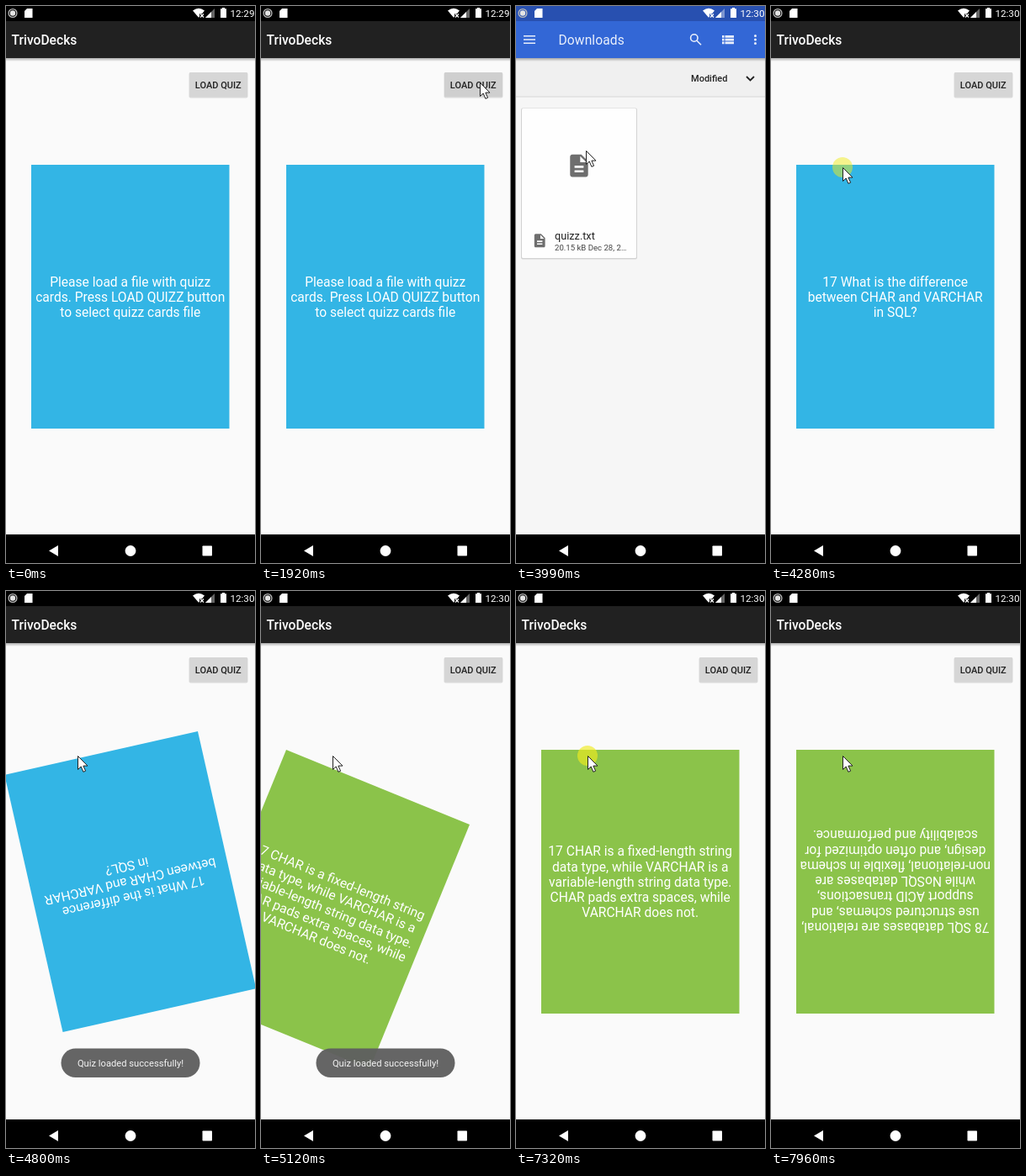
Write an HTML page that moves like this. It is 296 by 663 pixels and loops after 8 s.

```html
<!DOCTYPE html>
<html lang="en">
<head>
<meta charset="utf-8">
<title>Quiz cards</title>
<style>
  html, body { margin: 0; width: 100%; height: 100%; overflow: hidden; background: #fafafa; }
  svg { display: block; width: 296px; height: 663px; font-family: Roboto, sans-serif; }
  .mid { text-anchor: middle; }
  .med { font-weight: 500; }
</style>
</head>
<body>
<svg viewBox="0 0 296 663">
  <defs>
    <linearGradient id="shade" x2="0" y2="1">
      <stop stop-color="#000" stop-opacity=".3"/>
      <stop offset="1" stop-color="#000" stop-opacity="0"/>
    </linearGradient>
    <path id="doc" d="M14 2H6C4.9 2 4 2.9 4 4v16c0 1.1.9 2 2 2h12c1.1 0 2-.9 2-2V8zM16 18H8v-2h8zM16 14H8v-2h8zM13 9V3.5L18.500 9z"/>
  </defs>

  <rect width="296" height="663" fill="#fafafa"/>
  <rect x="217.500" y="79" width="70" height="30.500" rx="2" fill="#000" opacity=".13"/>
  <rect id="button" x="218" y="79" width="69" height="29" rx="1.500"/>
  <text class="mid med" x="252.300" y="97.500" font-size="11" fill="#1f1f1f">LOAD QUIZ</text>

  <g id="card">
    <rect id="face" x="30" y="189" width="235.500" height="314"/>
    <g id="words" class="mid" font-size="15.600" fill="#fff"></g>
  </g>

  <rect y="62" width="296" height="4" fill="url(#shade)"/>
  <rect y="18" width="296" height="44" fill="#212121"/>
  <text class="med" x="6.500" y="46" font-size="15.600" fill="#fff">TrivoDecks</text>
  <rect width="296" height="18" fill="#000"/>

  <g id="toast">
    <rect x="65.500" y="544.500" width="165" height="34.500" rx="17.200" fill="#5f5f5f" fill-opacity=".96"/>
    <text class="mid" x="148" y="566" font-size="11.200" fill="#f4f4f4">Quiz loaded successfully!</text>
  </g>

  <g id="files">
    <rect width="296" height="663" fill="#f6f6f6"/>
    <rect y="62" width="296" height="46" fill="#f0f0f0"/>
    <rect y="107.500" width="296" height="1" fill="#d8d8d8"/>
    <rect y="62" width="296" height="4" fill="url(#shade)"/>
    <rect y="18" width="296" height="44" fill="#3367d6"/>
    <rect width="296" height="18" fill="#2850b0"/>
    <g fill="#e9effb">
      <path d="M9 35h14v1.500H9zM9 39.300h14v1.500H9zM9 43.600h14v1.500H9z"/>
      <text x="50.500" y="46" font-size="15.600" letter-spacing=".1">Downloads</text>
      <path d="M245 35h2.500v2.800H245zM248.500 35h10.500v2.800H248.500zM245 38.700h2.500v2.800H245zM248.500 38.700h10.500v2.800H248.500zM245 42.400h2.500v2.800H245zM248.500 42.400h10.500v2.800H248.500z"/>
      <circle cx="284.500" cy="35.500" r="1.500"/><circle cx="284.500" cy="40" r="1.500"/><circle cx="284.500" cy="44.500" r="1.500"/>
    </g>
    <g fill="none" stroke="#e9effb" stroke-width="1.600">
      <circle cx="211.800" cy="38" r="4.200"/><path d="M215 41.200l5 5"/>
    </g>
    <text class="med" x="208" y="90" font-size="11" fill="#222">Modified</text>
    <path d="M274 84l4.500 4.500 4.500-4.500" fill="none" stroke="#222" stroke-width="1.800"/>
    <rect x="6" y="121.500" width="138" height="180" rx="2" fill="#000" opacity=".14"/>
    <rect x="7" y="122" width="136" height="178" rx="1.500" fill="#fefefe"/>
    <g fill="#6e6e6e" fill-rule="evenodd">
      <use href="#doc" transform="translate(58.900 174) scale(1.340)"/>
      <use href="#doc" transform="translate(18.600 269.700) scale(.8)"/>
    </g>
    <text x="46" y="278" font-size="12.700" fill="#222">quizz.txt</text>
    <text x="46" y="291" font-size="9.600" fill="#444">20.15 kB Dec 28, 2…</text>
  </g>

  <g fill="#fff">
    <circle cx="8" cy="8.500" r="4.900" fill="none" stroke="#bbb" stroke-width="1.300"/>
    <circle cx="8" cy="8.500" r="3.200" fill="#e4e4e4"/>
    <path d="M25 3h6.500v11H22V6z"/>
    <path d="M222 5.500q7-5.500 14 0l-3 3.800h-3v3.500l-1 1z"/>
    <path d="M231 9.500l4 4m0-4l-4 4" stroke="#fff" stroke-width="1.200"/>
    <path d="M248 3v11h-11z" opacity=".4"/><path d="M244 7v7h-7z"/>
    <path d="M257 2h3v1.300h2V14h-7V3.300h2z"/>
    <text id="clock" x="295.500" y="13" font-size="11.700" text-anchor="end"></text>
  </g>

  <rect y="629" width="296" height="34" fill="#000"/>
  <g fill="#fff">
    <path d="M51 648.500l11-6.500v13z"/>
    <circle cx="148" cy="648.500" r="6.400"/>
    <rect x="233.500" y="642.500" width="11.500" height="12" rx=".8"/>
  </g>

  <g id="mouse">
    <circle id="click" r="12" fill="#f0eb1e"/>
    <path d="M.5.500V16.500L4.200 13 6.900 19.300 9.600 18.200 6.900 12.100H12z" fill="#fff" stroke="#222" stroke-width="1"/>
  </g>
</svg>

<script>
const LOOP = 8000, HALF = 350;
const $ = id => document.getElementById(id);
const set = (id, name, value) => $(id).setAttribute(name, value);

const BLUE = '#33b5e5', GREEN = '#8bc34a';
const faces = {
  intro: [BLUE, 'Please load a file with quizz|cards. Press LOAD QUIZZ button|to select quizz cards file'],
  ask: [BLUE, '17 What is the difference|between CHAR and VARCHAR|in SQL?'],
  answer: [GREEN, '17 CHAR is a fixed-length string|data type, while VARCHAR is a|variable-length string data type.|CHAR pads extra spaces, while|VARCHAR does not.'],
  next: [GREEN, '78 SQL databases are relational,|use structured schemas, and|support ACID transactions,|while NoSQL databases are|non-relational, flexible in schema|design, and often optimized for|scalability and performance.']
};
const flips = [
  { start: 4500, anchor: 5120, step: 66, from: 'ask', to: 'answer' },
  { start: 7610, anchor: 7960, step: 64, from: 'answer', to: 'next' }
];
const path = [
  [500, 297, 97], [1150, 260, 91], [3430, 260, 91],
  [3680, 83, 172], [4110, 83, 172], [4280, 85, 192], [4360, 85, 192], [4430, 85, 196]
];
// start, end, strength
const clicks = [[1600, 1660, .6], [4230, 4360, .5], [7320, 7440, .65]];

const clamp = x => Math.max(0, Math.min(1, x));
const ease = x => (1 - Math.cos(Math.PI * clamp(x))) / 2;
const ramp = (t, a, b) => clamp((t - a) / (b - a));

let shown = '';
function showFace(name) {
  if (name === shown) return;
  shown = name;
  const [color, text] = faces[name], lines = text.split('|');
  set('face', 'fill', color);
  $('words').innerHTML = lines.map((line, i) =>
    `<text x="147.700" y="${351.8 + (i - (lines.length - 1) / 2) * 18.25}">${line}</text>`).join('');
}

function drawCard(t) {
  let name = t < 4110 ? 'intro' : 'ask', turn = '';
  for (const f of flips) {
    const q = f.anchor + Math.floor((t - f.anchor) / f.step) * f.step;
    const u = (q - f.start) / HALF;
    if (u < 0) continue;
    name = u < 1 ? f.from : f.to;
    // turn over about the centre, then back about the top left corner
    turn = u <= 1 ? `rotate(${180 * ease(u)} 147.75 346)`
                  : `rotate(${180 * (1 - ease(u - 1))} 30 189)`;
  }
  showFace(name);
  set('card', 'transform', turn);
}

function drawMouse(t) {
  let [, x, y] = path[0];
  for (let i = 1; i < path.length; i++) {
    const [a, x0, y0] = path[i - 1], [b, x1, y1] = path[i];
    if (t < a) break;
    const k = ease(ramp(t, a, b));
    x = x0 + (x1 - x0) * k;
    y = y0 + (y1 - y0) * k;
  }
  set('mouse', 'transform', `translate(${x} ${y})`);
  set('mouse', 'opacity', t < 500 ? 0 : 1);
  const hit = clicks.find(([a, b]) => t >= a && t < b);
  set('click', 'opacity', hit ? hit[2] : 0);
}

function draw(t) {
  drawCard(t);
  drawMouse(t);
  const hover = t < 3900 ? ramp(t, 1330, 1400) : 0;
  const grey = Math.round(214 - 7 * hover);
  set('button', 'fill', `rgb(${grey},${grey},${grey})`);
  set('files', 'opacity', ramp(t, 3400, 3640) * (1 - ramp(t, 4110, 4250)));
  set('toast', 'opacity', ramp(t, 4400, 4650) - .2 * ramp(t, 5550, 5680) - .8 * ramp(t, 5820, 6020));
  $('clock').textContent = t < 3430 ? '12:29' : '12:30';
}

const begin = performance.now();
function tick() {
  draw((performance.now() - begin) % LOOP);
  requestAnimationFrame(tick);
}
tick();
</script>
</body>
</html>
```
